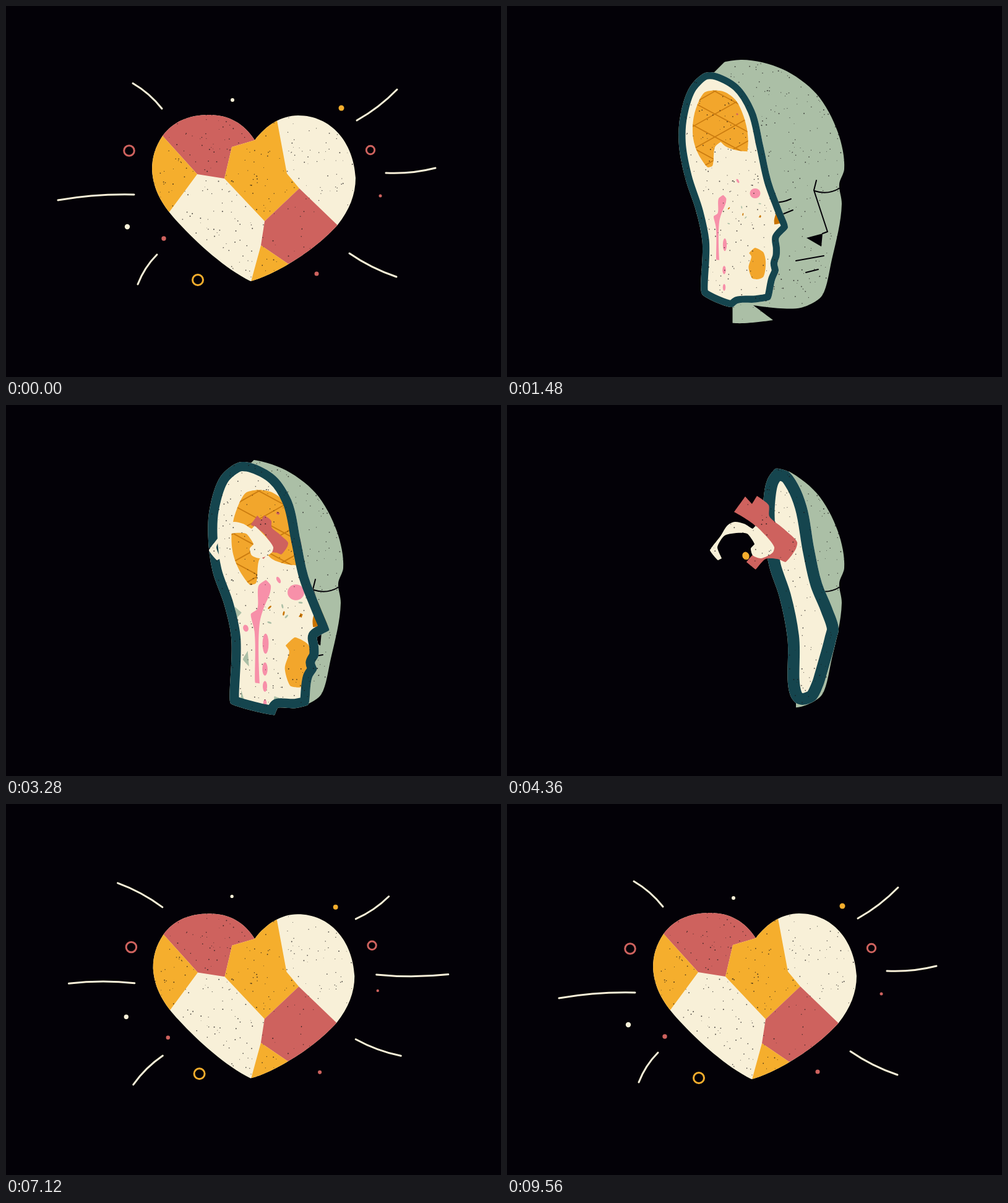
Recreate the animation shown at these times as an HTML page with a canvas. Size 800 px wide and 600 px high, loop 9600 ms.

```html
<!DOCTYPE html>
<html lang="en">
<head>
<meta charset="utf-8">
<title>Head and heart</title>
<style>
html, body { margin: 0; width: 100%; height: 100%; overflow: hidden; background: #030107; }
canvas { display: block; width: 800px; height: 600px; }
</style>
</head>
<body>
<canvas id="stage" width="800" height="600"></canvas>
<script>
const ctx = document.getElementById('stage').getContext('2d');
const INK = '#030107', CREAM = '#f8f0d8', RED = '#ce625e', YELLOW = '#f5ae2d',
  GREEN = '#abbfa6', TEAL = '#15454e', PINK = '#f790a9', BROWN = '#c87300', ORANGE = '#f2a62c';

// ---------- helpers ----------
const lerp = (a, b, u) => a + (b - a) * u;
const mix = (a, b, u) => a.map((v, i) => lerp(v, b[i], u));
const clamp = u => Math.min(1, Math.max(0, u));
const points = s => s.trim().split(/\s+/).map(p => p.split(',').map(Number));
const blend = (a, b, u) => a.map((p, i) => mix(p, b[i], u));
const centre = ps => [0, 1].map(k => ps.reduce((sum, p) => sum + p[k], 0) / ps.length);

// Piecewise linear value through [time, value] stops.
function key(t, ...stops) {
  const i = stops.findIndex(s => t <= s[0]);
  if (i < 0) return stops[stops.length - 1][1];
  if (i === 0) return stops[0][1];
  const [t0, a] = stops[i - 1], [t1, b] = stops[i];
  return lerp(a, b, (t - t0) / (t1 - t0));
}

let seed = 11;
const rnd = () => (seed = (seed * 16807) % 2147483647) / 2147483647;

function poly(ps) {
  ctx.beginPath();
  ps.forEach(p => ctx.lineTo(...p));
  ctx.closePath();
}

function unit(a, b) {
  const x = b[0] - a[0], y = b[1] - a[1], len = Math.hypot(x, y) || 1e-6;
  return [x / len, y / len, len];
}

// Closed curve: gentle turns are rounded, sharp turns stay corners.
function curve(ps) {
  const n = ps.length;
  const handles = ps.map((p, i) => {
    const a = unit(ps[(i + n - 1) % n], p), b = unit(p, ps[(i + 1) % n]);
    const soft = 0.34 * Math.max(0, a[0] * b[0] + a[1] * b[1]);
    const [tx, ty] = unit([0, 0], [a[0] + b[0], a[1] + b[1]]);
    const at = d => [p[0] + tx * soft * d, p[1] + ty * soft * d];
    return { before: at(-a[2]), after: at(b[2]) };
  });
  ctx.beginPath();
  ctx.moveTo(...ps[0]);
  for (let i = 0; i < n; i++) {
    const j = (i + 1) % n;
    ctx.bezierCurveTo(...handles[i].after, ...handles[j].before, ...ps[j]);
  }
  ctx.closePath();
}

function fill(color) { ctx.fillStyle = color; ctx.fill(); }
function shape(color, ps) { curve(ps); fill(color); }

function oval(color, x, y, rx, ry = rx, turn = 0) {
  ctx.beginPath();
  ctx.ellipse(x, y, rx, ry, turn, 0, 7);
  fill(color);
}

function line(d, color, width) {
  ctx.strokeStyle = color;
  ctx.lineWidth = width;
  ctx.lineCap = ctx.lineJoin = 'round';
  ctx.stroke(new Path2D(d));
}

function scaled([cx, cy], s, draw) {
  if (s <= 0) return;
  ctx.save();
  ctx.translate(cx, cy);
  ctx.scale(s, s);
  ctx.translate(-cx, -cy);
  draw();
  ctx.restore();
}

// ---------- speckles ----------
const specks = Array.from({ length: 620 }, () =>
  [225 + rnd() * 350, 80 + rnd() * 440, 0.45 + rnd() * 0.55]);

function speckle() {
  ctx.globalCompositeOperation = 'source-atop';
  for (const s of specks) oval('rgba(20,16,18,.75)', ...s);
  ctx.globalCompositeOperation = 'source-over';
}

// ---------- head ----------
const HEAD = points(`303,499 303,400 294,337 264,225 274,148 315,104 378,87 445,102 500,142 535,205
  545,264 537,288 541,320 525,410 508,470 475,488 398,484 430,508 370,513`);
const FACE = 'M405 314Q435 323 459 312M440 339L462 330M500 282L496 298L518 365L510 368' +
  'M497 299Q518 306 537 295M467 412L512 404M483 431L503 426';

// Outline of the cut surface at the back, middle and front of the head.
const BACK = points(`286,128 297,127 325,145 348,187 361,240 374,295 386,330 391,352 388,377 386,392
  384,405 383,418 381,433 379,448 367,461 345,466 322,470 308,465 306,445 303,385 294,337 278,283
  264,225 266,180 274,148`);
const MIDDLE = points(`352,89 372,88 422,110 452,150 468,215 480,272 500,325 517,365 491,374 496,390
  497,405 491,414 497,423 488,436 484,488 460,493 424,492 421,509 325,488 328,375 318,330 297,270
  291,215 295,170 318,112`);
const FRONT = points(`434,103 455,108 470,128 484,163 497,235 509,288 525,327 536,362 532,380 528,396
  524,410 520,424 516,438 511,454 499,477 488,483 477,485 467,482 458,470 453,375 440,310 424,262
  415,205 414,160 421,120`);
const TOP = 1, NECK = 17;

function cutAt(t) {
  if (t < 760) return blend(BACK.map(() => [262, 225]), BACK, clamp((t - 40) / 720));
  if (t < 2200) return blend(BACK, MIDDLE, (t - 760) / 1440);
  if (t < 4360) return blend(MIDDLE, FRONT, ((t - 2200) / 2160) ** 1.8);
  return blend(FRONT, FRONT.map(() => [543, 275]), clamp((t - 4360) / 840));
}

// Size of what the cut shows: grows until the middle, then shrinks away.
const presence = (t, from, to) =>
  t < 2200 ? clamp((t - from) / (2200 - from)) : 1 - clamp((t - 2200) / (to - 2200)) ** 2;

const BRAIN = points(`340,116 365,110 395,114 425,136 443,170 456,215 459,250 457,276 425,272 398,262
  385,250 370,262 362,315 350,319 325,285 310,240 313,175`);

function brain(t) {
  const s = t < 420 ? 0 : t < 760 ? 0.24 * (t - 420) / 340 : Math.max(0.24 * (t < 2200), presence(t, 420, 4300));
  if (s <= 0) return;
  ctx.save();
  ctx.translate(key(t, [760, -78], [2200, 0], [4300, 70]), key(t, [760, -31], [2200, 0]));
  scaled([384, 214], s, () => {
    shape(ORANGE, BRAIN);
    ctx.clip();
    for (let y = 75; y < 330; y += 62) {
      line(`M300 ${y}L470 ${y + 92}M300 ${y + 76}L470 ${y - 20}`, '#cb7c10', 2.2 / Math.sqrt(Math.max(s, 0.2)));
    }
  });
  ctx.restore();
}

const ORGANS = [
  [PINK, `386,258 397,270 396,285 380,325 372,355 372,494 362,493 360,375 352,335 366,325 370,270`],
  [BROWN, '471,298 492,359 455,366 454,350'],
  [ORANGE, '428,359 458,375 467,410 458,465 440,473 418,470 405,430 415,390 407,378'],
  [GREEN, '330,322 346,336 335,348'], [GREEN, '354,392 357,428 343,412'],
  [GREEN, '342,455 352,489 340,488'], [GREEN, '395,466 406,470 403,500 392,497'],
  [RED, '428,205 440,212 448,228 442,234 432,233 426,220']
].map(([color, ps]) => [color, points(ps)]);
const CRUMBS = Array.from({ length: 8 }, (_, i) =>
  [i % 2 ? GREEN : BROWN, 385 + rnd() * 55, 318 + rnd() * 38, 2, 5, rnd() * 3]);

function organs(t) {
  const s = presence(t, 900, 4200);
  const bead = (color, x, y, ...form) => scaled([x, y], s, () => oval(color, x, y, ...form));
  ctx.save();
  ctx.translate(key(t, [760, -60], [2200, 0], [4360, 75]), 0);
  for (const [color, ps] of ORGANS) scaled(centre(ps), s, () => shape(color, ps));
  bead(PINK, 431, 303, 19, 18);
  bead(PINK, 403, 283, 4, 8, -0.5);
  bead(PINK, 350, 361, 6, 8, -0.3);
  bead(PINK, 382, 386, 7, 23);
  for (let i = 0; i < 3; i++) bead(PINK, 381, 427 + i * 28, 6 - i, 15 - i * 2.5);
  bead(RED, 402, 175, 4, 3, 0.5);
  bead(GREEN, 474, 388, 2.5, 9, -0.2);
  bead(BROWN, 314, 286, 2.5, 7);
  for (const crumb of CRUMBS) bead(...crumb);
  ctx.restore();
}

const RED_CORE = points(`385,148 396,160 404,147 423,162 424,180 447,200 469,222 467,232 450,254
  437,249 418,249 402,266 387,254 398,242 425,232 402,196 367,173`);
const CREAM_CORE = points(`328,235 345,212 357,194 368,189 383,192 397,200 402,195 432,230 430,238
  410,248 397,243 394,232 400,225 388,208 352,211 340,230 347,248 341,251`);

// Pieces the moving cut leaves behind in the air.
function core(t) {
  scaled([405, 235], key(t, [4480, 1], [5320, 0.25], [5560, 0]), () => {
    scaled([437, 224], key(t, [2260, 0], [2500, 0.25], [4200, 1]), () => shape(RED, RED_CORE));
    scaled([390, 218], key(t, [1500, 0], [2100, 1]), () => shape(CREAM, CREAM_CORE));
    scaled([386, 244], key(t, [3900, 0], [4360, 1]), () => oval(YELLOW, 386, 244, 5.5, 6.5, -0.4));
  });
}

function head(t) {
  if (t < 5200) {
    shape(GREEN, HEAD);
    line(FACE, INK, 2);
    poly([[484, 375], [510, 368], [508, 389]]);
    fill(INK);

    const cut = cutAt(t), top = cut[TOP], neck = cut[NECK];
    ctx.globalCompositeOperation = 'destination-out';
    poly([[0, 0], [top[0] + top[1], 0], top, centre(cut), neck, [neck[0], 600], [0, 600]]);
    ctx.fill();
    ctx.globalCompositeOperation = 'source-over';

    ctx.save();
    shape(CREAM, cut);
    ctx.clip();
    brain(t);
    organs(t);
    curve(cut);
    ctx.strokeStyle = TEAL;
    ctx.lineJoin = 'round';
    ctx.lineWidth = 2 * key(t, [760, 11.5], [2200, 11], [4360, 19], [5200, 10]);
    ctx.stroke();
    ctx.restore();
  }
  core(t);
}

// ---------- swirl ----------
function track(d) {
  const el = document.createElementNS('http://www.w3.org/2000/svg', 'path');
  el.setAttribute('d', d);
  return el;
}
const SWEEP = 'M405 235C500 205 566 300 553 400C543 478 480 521 428 518C370 513 325 465 303 444' +
  'C255 424 266 380 261 355C260 330 278 305 288 294';
const HALF = track(SWEEP).getTotalLength();
const ORBIT = track(SWEEP + 'C312 255 360 218 410 221C450 232 450 280 400 305');
const FULL = ORBIT.getTotalLength();
// [colour, distance behind the tip from, to, side offset, half width]
const STREAKS = [
  [RED, 0, 145, -1, 11], [CREAM, 12, 60, 2, 5], [CREAM, 46, 93, -6, 4.5], [CREAM, 74, 128, 15, 5],
  [CREAM, 95, 152, 5, 5.5], [RED, 162, 185, 0, 2], [CREAM, 318, 324, 0, 1.8], [RED, 367, 371, 0, 1.5]
];

function swirl(t) {
  if (t < 5400 || t > 6400) return;
  const tip = key(t, [5380, 0], [5920, HALF], [6360, FULL]);
  const squeeze = key(t, [5920, 1], [6400, 0.15]);
  const at = d => {
    const p = ORBIT.getPointAtLength(Math.min(FULL, Math.max(0, d)));
    return [p.x, p.y];
  };
  for (const [color, from, to, side, half] of STREAKS) {
    const a = Math.max(0, tip - to * squeeze), b = tip - from * squeeze;
    if (b - a < 1) continue;
    const left = [], right = [];
    for (let i = 0; i <= 32; i++) {
      const u = i / 32, d = lerp(a, b, u), [x, y] = at(d);
      const [tx, ty] = unit(at(d - 3), at(d + 3));
      const w = half * Math.max(0, 4 * u * (1 - u)) ** 0.4;
      const edge = o => [x + ty * o, y - tx * o];
      left.push(edge(side + w));
      right.unshift(edge(side - w));
    }
    poly([...left, ...right]);
    fill(color);
  }
}

// ---------- heart ----------
const HEART = new Path2D('M402 217C385 190 360 176 328 176C295 176 270 187 253 210C241 228 236 245 236 265' +
  'C238 300 255 325 278 350C310 385 355 425 395 445C420 440 490 405 536 354C555 330 565 305 565 278' +
  'C562 220 525 177 472 177C445 177 420 193 402 217Z');
// Seam corners a to p; the last five lie outside the heart.
const SEAMS = points(`253,210 309,272 353,279 365,228 402,217 438,185 454,271 474,295 418,348 412,387 456,417
  402,150 200,150 200,420 430,150 556,374`);
const PATCHES = [[RED, 'abcdelm'], [YELLOW, 'abnm'], [YELLOW, 'cdelofghi'], [RED, 'hpkji']];

// Rays: inner and outer end at rest, then at full swing.
const RAYS = [
  [[252, 166, 205, 125], [253, 167, 183, 132]], [[567, 185, 632, 135], [565, 186, 612, 155]],
  [[614, 270, 694, 262], [596, 277, 702, 278]], [[555, 400, 631, 438], [567, 377, 629, 398]],
  [[244, 402, 213, 450], [255, 408, 206, 453]], [[207, 305, 84, 314], [208, 287, 121, 286]]
];
// Specks around the heart: colour, x, y, swing x, swing y, radius.
const DOTS = [
  [CREAM, 366, 152, -1, -3, 3], [YELLOW, 542, 165, -11, 2, 4.5], [RED, 605, 307, -5, -6, 2.5],
  [CREAM, 196, 357, -2, -15, 4.2], [RED, 255, 376, 8, 2, 3.7], [RED, 502, 433, 6, 1, 3.5]
];
const RINGS = [[RED, 199, 234, 4, -3, 8.3], [YELLOW, 310, 443, 3, -8, 8.5], [RED, 589, 233, 3, -5, 6.7]];

function heart(t) {
  if (t < 6280) return;
  const beat = t >= 8600 ? t - 8600 : t - 7600;
  const swing = key(beat, [0, 0.85], [600, 1], [960, 0]);
  const pop = key(t, [6280, 0.12], [6400, 0.5], [6520, 0.86], [6640, 1.03], [6760, 0.98], [6880, 1]);
  scaled([400, 310], pop * (1 - 0.012 * swing), () => {
    ctx.clip(HEART);
    ctx.fillStyle = CREAM;
    ctx.fillRect(200, 150, 400, 320);
    for (const [color, corners] of PATCHES) {
      poly([...corners].map(c => SEAMS[c.charCodeAt(0) - 97]));
      fill(color);
    }
    poly([SEAMS[9], SEAMS[10], [500, 447], [388, 475]]);
    fill(YELLOW);
    speckle();
  });

  const grow = key(t, [6580, 0], [7120, 1]);
  if (!grow) return;
  const reach = key(beat, [0, 14], [480, 0]);
  for (const [rest, far] of RAYS) {
    const [x0, y0, x1, y1] = mix(rest, far, swing);
    const [ux, uy, len] = unit([x0, y0], [x1, y1]);
    const size = (len + reach * Math.abs(ux) ** 6) * grow;
    const bow = 6 * grow;
    line(`M${x0} ${y0}Q${x0 + ux * size / 2 - uy * bow} ${y0 + uy * size / 2 + ux * bow} ` +
      `${x0 + ux * size} ${y0 + uy * size}`, CREAM, 3);
  }
  const place = (dx, dy) => [400 + (dx - 400) * (0.8 + 0.2 * grow), 310 + (dy - 310) * (0.8 + 0.2 * grow)];
  for (const [color, x, y, dx, dy, r] of DOTS) {
    oval(color, ...place(x + dx * swing, y + dy * swing), r * grow * (1 - 0.15 * swing));
  }
  for (const [color, x, y, dx, dy, r] of RINGS) {
    ctx.beginPath();
    ctx.arc(...place(x + dx * swing, y + dy * swing), r * grow, 0, 7);
    ctx.strokeStyle = color;
    ctx.lineWidth = 3;
    ctx.stroke();
  }
}

// ---------- clock ----------
const LOOP = 9600, STEP = 120;
function snap(t) {
  if (t < 40) return 9560;
  const base = t < 8600 ? 40 : 8600;
  return base + Math.floor((t - base) / STEP) * STEP;
}

const start = performance.now();
let shown = -1;
function frame() {
  const t = snap((performance.now() - start) % LOOP);
  if (t !== shown) {
    shown = t;
    ctx.clearRect(0, 0, 800, 600);
    if (t < 5600) head(t);
    swirl(t);
    if (t < 6280) speckle();
    heart(t);
  }
  requestAnimationFrame(frame);
}
frame();
</script>
</body>
</html>
```
